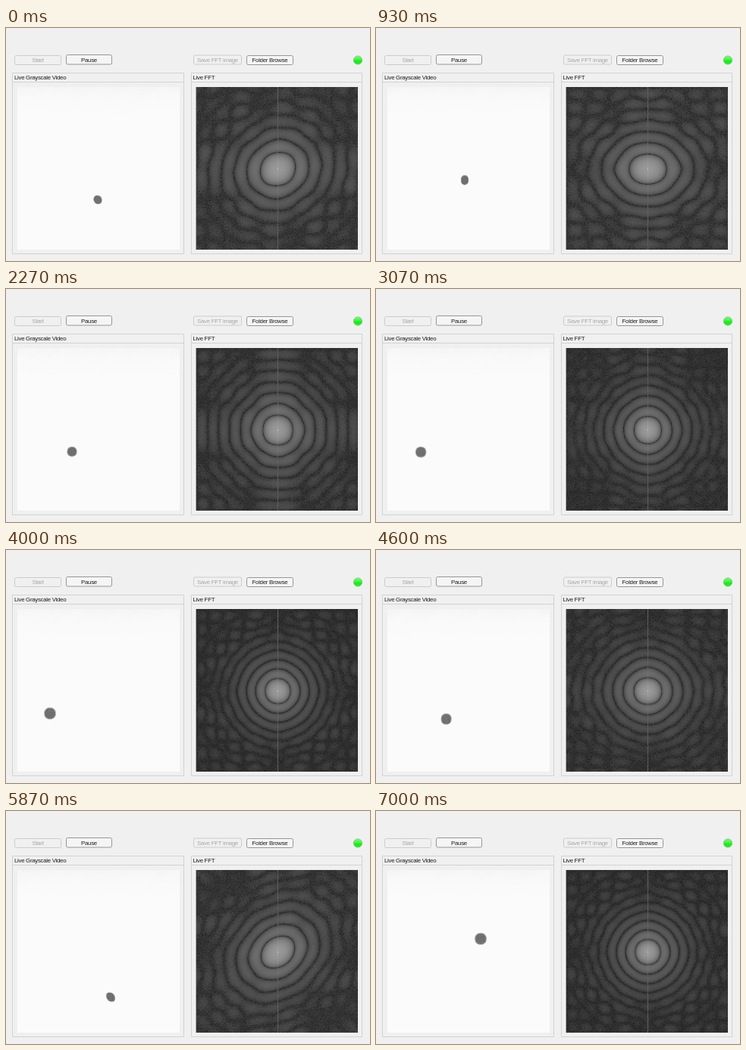
Recreate the animation shown at these times as an HTML page with a canvas. Size 480x308 px, loop 7070 ms.

```html
<!DOCTYPE html>
<html lang="en">
<head>
<meta charset="utf-8">
<title>Live FFT</title>
<style>
  html, body { margin: 0; width: 480px; height: 308px; overflow: hidden; background: #f0f0f0; }
  svg, canvas { position: absolute; left: 0; top: 0; display: block; }
  canvas { top: 78px; }
  #video { left: 15px; }
  #fft { left: 250px; }
  text { font: 7.9px "Liberation Sans", Arial, sans-serif; letter-spacing: -.31px; fill: #1c1c1c; }
  .mid { text-anchor: middle; }
  .off { fill: #a6a6a6; }
  .panel { fill: none; stroke: #d2d2d2; }
  .btn { fill: #f5f5f5; stroke: #969696; }
  .dim { fill: #f0f0f0; stroke: #cccccc; }
</style>
</head>
<body>
<svg width="480" height="308" viewBox="0 0 480 308">
  <defs>
    <linearGradient id="glow" x2="0" y2="1">
      <stop offset="0" stop-color="#7dfc7d"/>
      <stop offset=".45" stop-color="#35fa35"/>
      <stop offset=".6" stop-color="#0af50a"/>
      <stop offset="1" stop-color="#14fa14"/>
    </linearGradient>
  </defs>
  <rect class="dim" x="11.5" y="36.5" width="61" height="12" rx="2"/>
  <text class="mid off" x="42" y="45">Start</text>
  <rect class="btn" x="79.5" y="35.5" width="60" height="12.5" rx="2"/>
  <text class="mid" x="109.5" y="44.7">Pause</text>
  <rect class="dim" x="247.5" y="36" width="63" height="12" rx="2"/>
  <text class="mid off" x="279" y="44.7">Save FFT image</text>
  <rect class="btn" x="317.5" y="36.5" width="61" height="12" rx="2"/>
  <text class="mid" x="348" y="45.2">Folder Browse</text>
  <circle cx="464" cy="42.5" r="5.6" fill="url(#glow)" stroke="#8fb08f" stroke-width=".8"/>
  <path class="panel" d="M8.5 59.5H234.5V298.5H8.5ZM8.5 71.5H234.5M244.5 59.5H469.5V298.5H244.5ZM244.5 71.5H469.5"/>
  <text x="11" y="68.2">Live Grayscale Video</text>
  <text x="246.5" y="68.2">Live FFT</text>
</svg>
<canvas id="video" width="214" height="215"></canvas>
<canvas id="fft" width="214" height="215"></canvas>
<script>
const W = 214, H = 215, C = 108, M = 22, LOOP = 7070, STEP = 200 / 3;

// tick, centre x, centre y, half width, half height, skew
const keys = [
  [0, 121, 227, 5.5, 5.7, .1],
  [8, 116, 214, 5.3, 6, .05],
  [14, 117, 201, 5.1, 6.4, 0],
  [20, 95, 205, 5.7, 6.3, 0],
  [30, 89, 212, 6.3, 6.4, 0],
  [34, 87, 215, 6.4, 6.4, 0],
  [43, 72, 216, 6.8, 6.8, 0],
  [50, 42, 215, 7.2, 7.2, 0],
  [55, 46, 215, 7.4, 7.4, 0],
  [60, 58, 216, 7.6, 7.6, 0],
  [67, 84, 222, 7, 7.2, 0],
  [78, 131.5, 230, 6.2, 6.9, 0],
  [88, 138, 246, 5.7, 6, .24],
  [97, 139, 206, 6.6, 6.7, .08],
  [105, 138, 169, 7.6, 7.6, 0]
];

function pose(k) {
  const i = Math.max(1, keys.findIndex(p => p[0] >= k));
  const a = keys[i - 1], b = keys[i], f = (k - a[0]) / (b[0] - a[0]);
  return a.map((v, j) => v + (b[j] - v) * f);
}

// The camera skips ticks in a mostly regular rhythm.
function held(k) {
  if (k < 12) return k % 3 === 2;
  if (k < 33) return k > 12 && k % 3 === 0;
  return k % 3 === 2 && ![38, 41, 62, 89].includes(k);
}

function random(seed) {
  let s = seed * 7919 + 12345;
  return () => {
    s = s + 0x6D2B79F5 | 0;
    let t = Math.imul(s ^ s >>> 15, 1 | s);
    t = t + Math.imul(t ^ t >>> 7, 61 | t) ^ t;
    return ((t ^ t >>> 14) >>> 0) / 4294967296;
  };
}

const surface = id => {
  const ctx = document.getElementById(id).getContext("2d");
  const img = ctx.createImageData(W, H);
  img.data.fill(255);
  return {
    set(x, y, g) {
      if (x < 0 || y < 0 || x >= W || y >= H) return;
      const i = (y * W + x) * 4;
      img.data[i] = img.data[i + 1] = img.data[i + 2] = g;
    },
    show: () => ctx.putImageData(img, 0, 0)
  };
};
const video = surface("video"), fft = surface("fft");

const cosT = Array.from({ length: H }, (_, i) => Math.cos(2 * Math.PI * i / H));
const sinT = Array.from({ length: H }, (_, i) => Math.sin(2 * Math.PI * i / H));
const turn = n => (n % H + H) % H;

// Optical density of a slightly boxy, dome-shaped particle.
function makeBlob([, cx, cy, a, b, skew], rnd) {
  const x0 = Math.floor(cx) - M / 2, y0 = Math.floor(cy) - M / 2;
  const spread = 1.17, power = 2.25, cells = new Float64Array(M * M);
  for (let y = 0; y < M; y++) for (let x = 0; x < M; x++) {
    const p = (x + x0 + .5 - cx) / (a * spread), q = (y + y0 + .5 - cy) / (b * spread);
    const d = Math.abs(p) ** power + Math.abs(q) ** power - 2 * skew * p * q;
    cells[y * M + x] = Math.sqrt(Math.max(0, 1 - d)) * (1 - .05 * rnd());
  }
  return { x0: x0 - 15, y0: y0 - 78, cells };
}

function drawVideo(blob, rnd) {
  const wisps = Array.from({ length: 40 }, rnd);
  for (let y = 0; y < H; y++) for (let x = 0; x < W; x++) {
    const haze = y < 40 ? 6 * Math.exp(-y / 13) * (.75 + .5 * wisps[(x >> 3) + (y >> 3)]) : 0;
    video.set(x, y, 251 - haze);
  }
  blob.cells.forEach((w, i) => {
    const ink = Math.min(1, (w - .36) / .36) - .12 * rnd();
    if (ink > 0) video.set(blob.x0 + i % M, blob.y0 + Math.floor(i / M), 251 - 148 * ink);
  });
  video.show();
}

function drawFft({ cells }, rnd) {
  const total = cells.reduce((s, w) => s + w, 0);
  const re = new Float64Array(M), im = new Float64Array(M);
  for (let u = -C; u <= C; u++) {
    for (let y = 0; y < M; y++) {
      re[y] = im[y] = 0;
      for (let x = 0; x < M; x++) {
        const w = cells[y * M + x], n = turn(u * x);
        re[y] += w * cosT[n];
        im[y] -= w * sinT[n];
      }
    }
    for (let v = -C; v <= 0; v++) {
      let r = rnd() - .5, i = rnd() - .5;
      for (let y = 0; y < M; y++) {
        const n = turn(v * y), c = cosT[n], s = sinT[n];
        r += re[y] * c + im[y] * s;
        i += im[y] * c - re[y] * s;
      }
      let g = 152 + 19.5 * Math.log(Math.hypot(r, i) / total + .0018);
      if (u === 0) g = v === 0 ? 225 : Math.max(g + 8, 86 + 14 * rnd());
      fft.set(C + u, C + v, g);
      fft.set(C - u, C - v, g);
    }
  }
  for (let y = 0; y < H; y++) fft.set(0, y, 165);
  fft.show();
}

let shown = -1;
function render(ms) {
  let k = Math.min(105, Math.floor((ms % LOOP + 4) / STEP));
  if (held(k)) k--;
  if (k !== shown) {
    shown = k;
    const rnd = random(k + 1), blob = makeBlob(pose(k), rnd);
    drawVideo(blob, rnd);
    drawFft(blob, rnd);
  }
}

const start = performance.now();
function loop() {
  render(performance.now() - start);
  requestAnimationFrame(loop);
}
loop();
</script>
</body>
</html>
```
